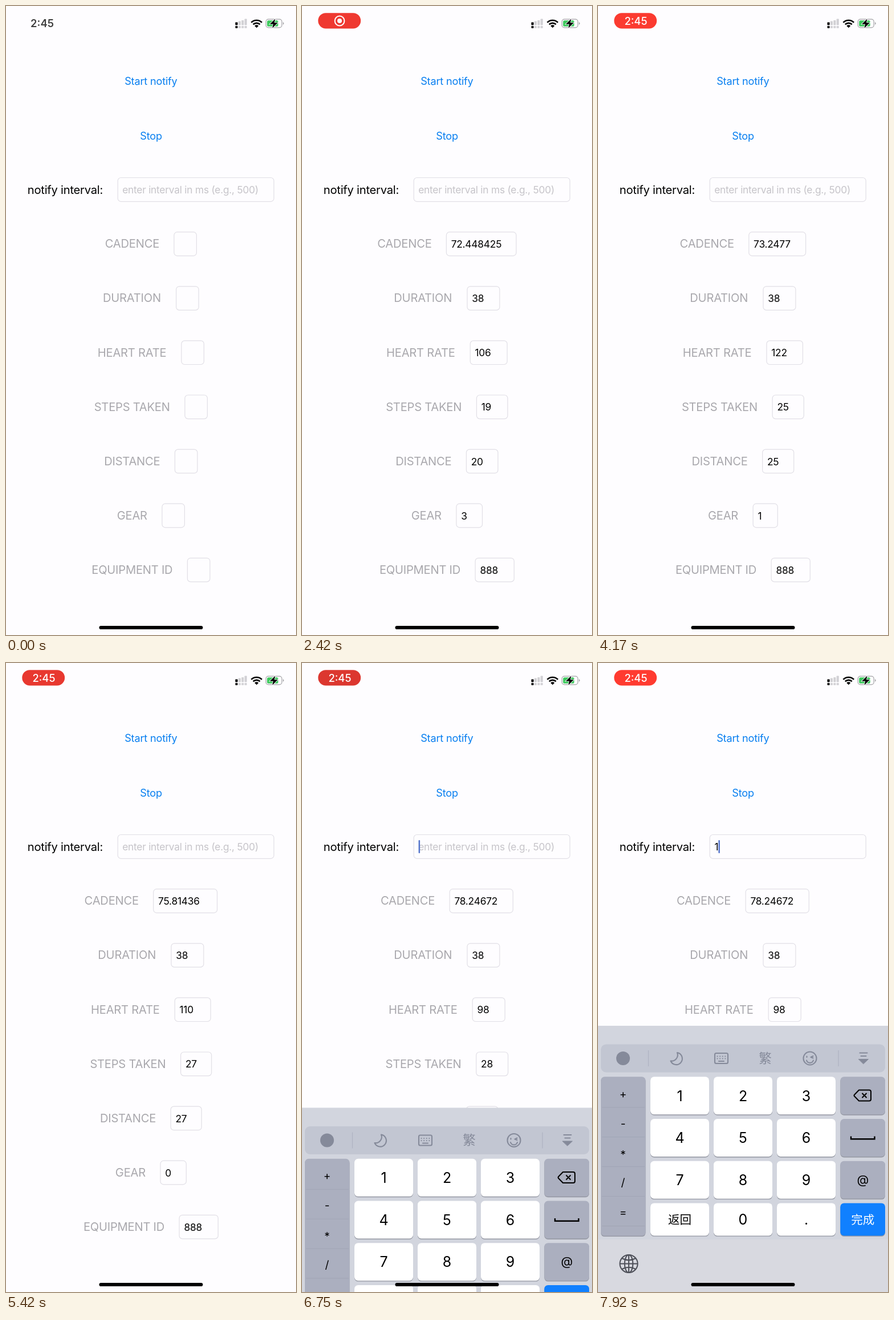
An HTML page for the animation above (8000 ms loop, 509 by 1101 pixels).

```html
<!DOCTYPE html>
<html lang="en">
<head>
<meta charset="utf-8">
<title>Notify monitor</title>
<style>
  html, body { margin: 0; width: 100%; height: 100%; overflow: hidden; background: #fefdff; }
  svg { display: block; font-family: Inter, sans-serif; }
  .label { font-size: 20.2px; letter-spacing: -.25px; fill: #a9a8ad; }
  .value { font-size: 17.4px; letter-spacing: -.26px; }
  .hint { fill: #c6c4c9; }
  .link { font-size: 18.2px; letter-spacing: -.22px; fill: #087ff0; }
  .clock { font-size: 18.4px; }
  .mid { text-anchor: middle; }
  .box { fill: none; stroke: #e1dfe6; stroke-width: 1.2; }
  .digit { font-size: 25px; }
  .sign { font-size: 19px; }
  .cjk { font-family: "Noto Sans CJK SC", "Noto Sans CJK JP", sans-serif; font-size: 20.5px; }
  .tool { fill: none; stroke: #858a9a; stroke-width: 2.1; stroke-linecap: round; stroke-linejoin: round; }
</style>
</head>
<body>
<svg id="stage" width="509" height="1101" viewBox="0 0 509 1101"></svg>
<script>
const LOOP = 8000, STEP = 250 / 3, CENTER = 254.7;
const KEYBOARD_TRAVEL = 466;

// Label and the distance from its left edge to its value box.
const ROWS = [
  ["CADENCE", 120], ["DURATION", 127.5], ["HEART RATE", 146], ["STEPS TAKEN", 158],
  ["DISTANCE", 123], ["GEAR", 78], ["EQUIPMENT ID", 167]
];
const READINGS = [
  [0, ["", "", "", "", "", "", ""]],
  [2000, ["72.448425", "38", "106", "19", "20", "3", "888"]],
  [3000, ["74.118576", "38", "115", "22", "23", "2", "888"]],
  [4000, ["73.2477", "38", "122", "25", "25", "1", "888"]],
  [4666, ["75.81436", "38", "110", "27", "27", "0", "888"]],
  [5500, ["78.24672", "38", "98", "28", "28", "-1", "888"]]
];
const ADVANCE = { 0: 11, 1: 8.8, 2: 10.2, 3: 11.3, 4: 10.6, 5: 10.6, 6: 10.8, 7: 9.6, 8: 11.3, 9: 11.4, ".": 4.6, "-": 7.3 };

const rowY = i => 416.4 + i * 95.1;
const boxWidth = text => text ? [...text].reduce((w, c) => w + ADVANCE[c], 34.3) : 39.5;
const rect = (x, y, w, h, r, fill, more = "") =>
  `<rect x="${x}" y="${y}" width="${w}" height="${h}" rx="${r}" fill="${fill}" ${more}/>`;
const text = (x, y, cls, content, more = "") =>
  `<text x="${x}" y="${y}" class="${cls}" ${more}>${content}</text>`;
const path = (d, more = "") => `<path d="${d}" ${more}/>`;

function statusBar() {
  const bars = [5, 7, 8.5, 11].map((h, i) => {
    const x = 402.5 + i * 5.4, fill = i ? "#d2d1d5" : "#000";
    return rect(x, 33.5 - h, 4.1, h, .8, fill) + rect(x, 35, 4.1, 3.8, .8, fill);
  }).join("");
  const arc = r => {
    const half = r * Math.SQRT1_2;
    return `M${439.8 - half} ${38.2 - half}a${r} ${r} 0 0 1 ${2 * half} 0`;
  };
  const wifi = path(arc(4.9) + "L439.8 38.2z") +
    path(arc(8.4) + arc(13.2), 'fill="none" stroke="#000" stroke-width="2.7"');
  const battery = rect(456.2, 23.2, 28, 14.6, 4.4, "none", 'stroke="#a3a2a6" stroke-width="1.2"') +
    rect(458.2, 25.2, 19.5, 10.6, 2.6, "#3cc95c") +
    path("M486 28.2a2.4 2.4 0 0 1 0 4.6z", 'fill="#a3a2a6"') +
    path("M472.5 22.5l-9.5 9.2h6l-1.6 7 9.6-9.4h-6z", 'stroke="#fefdff" stroke-width="1.6" paint-order="stroke"');
  return bars + wifi + battery +
    text(63.5, 37.2, "clock mid", "2:45", 'id="plainTime" font-weight="600"') +
    `<g id="pill">${rect(28.3, 12.2, 74.8, 27.2, 13.4, "#ff3b30", 'id="pillFill"')}
      <g id="record"><circle cx="66" cy="26" r="8.4" fill="none" stroke="#fff" stroke-width="2"/>
      <circle cx="66" cy="26" r="4" fill="#fff"/></g>
      ${text(66.5, 32.7, "clock mid", "2:45", 'id="pillTime" font-weight="500" fill="#fff"')}</g>`;
}

function form() {
  const rows = ROWS.map(([name], i) => {
    const y = rowY(i);
    return text(0, y + 6.9, "label", name) +
      `<rect class="box" y="${y - 20.7}" height="41.6" rx="5.5"/>` + text(0, y + 6.7, "value", "");
  }).map(row => `<g class="row">${row}</g>`).join("");
  return text(254.4, 138.3, "link mid", "Start notify") + text(254.6, 233.6, "link mid", "Stop") +
    text(37.8, 328.8, "label", "notify interval:", 'style="fill:#000"') +
    '<rect class="box" x="196.2" y="300.5" width="274" height="41.8" rx="5.5"/>' +
    text(204.2, 328, "value hint", "enter interval in ms (e.g., 500)", 'id="hint"') +
    text(204.4, 328, "value", "1", 'id="typed"') +
    rect(0, 310, 2.5, 23, 1.2, "#5374cc", 'id="caret"') + rows;
}

function toolbar() {
  const keys = [0, 1, 2, 3].map(i => `M${209.5 + i * 4.6} 688.5h.1M${209.5 + i * 4.6} 692.5h.1`).join("");
  return rect(5, 667.5, 499, 49, 9, "#c2c6d2") +
    path("M88.5 678v28M422 678v28", 'stroke="#b0b4c3" stroke-width="1.3"') +
    '<circle cx="44" cy="692" r="12" fill="#858a9a"/>' +
    `<g class="tool">${path("M139 682A10.6 10.6 0 1 1 127.5 696.5A10.6 10.6 0 0 0 139 682z")}
      <rect x="205" y="683" width="23" height="18" rx="2.5"/>
      ${path(keys + "M212 697h9")}
      <circle cx="372" cy="692" r="11.5"/>
      ${path("M366.5 688.5v1.5M373.5 690l4-2M373.5 690l4 1.5M366 695.5a6.3 6.3 0 0 0 12 0")}
      ${path("M459.5 682.5h13M461.5 688h9")}
      ${path("M457.5 693.5h17l-8.5 8z", 'fill="#858a9a" stroke-width="1"')}</g>` +
    text(293.5, 700, "cjk mid", "繁", 'style="font-size:22.5px" fill="#858a9a" font-weight="500"');
}

function keyboard() {
  const top = [724.3, 798, 871.7, 945.4], left = [92, 203, 314];
  const key = (x, y, w, h, fill, more) =>
    rect(x, y + 1.4, w, h, 6.5, "#9497a2") + rect(x, y, w, h, 6.5, fill, more);
  const height = r => r < 3 ? 66 : 57;
  const faces = ["1", "2", "3", "4", "5", "6", "7", "8", "9", "返回", "0", "."];
  const pad = faces.map((face, i) => {
    const r = Math.floor(i / 3), x = left[i % 3], cjk = face === "返回";
    return key(x, top[r], 103, height(r), "#fff", i ? "" : 'id="keyOne"') +
      text(x + 51.5, top[r] + height(r) / 2 + (cjk ? 8.4 : 9.2), (cjk ? "cjk" : "digit") + " mid", face);
  }).join("");
  const side = top.map((y, r) => key(425.3, y, 78.7, height(r), r < 3 ? "#abafbf" : "#1080ff")).join("");
  const signs = ["+", "-", "*", "/", "="].map((s, i) =>
    text(44, 761 + i * 51.8 + (s === "*" ? 2 : 0), "sign mid", s)).join("");
  const lines = [0, 1, 2, 3, 4].map(i => `M7 ${777.8 + i * 51.9}h75`).join("");
  return rect(0, 635, 509, 467, 0, "#d2d5de") + rect(0, 1009, 509, 94, 0, "#d8d9e0") + toolbar() +
    key(5, 724.3, 78.5, 278.4, "#abafbf") + path(lines, 'stroke="#a1a5b5"') + signs + pad + side +
    path("M458 747.5h18a3 3 0 0 1 3 3v13a3 3 0 0 1-3 3h-18l-8-8.2q-1-1.3 0-2.6zM463.5 753l8 8m0-8l-8 8",
      'fill="none" stroke="#000" stroke-width="2" stroke-linejoin="round"') +
    path("M444 828.5v4.8h41.5v-4.8", 'fill="none" stroke="#000" stroke-width="2.4"') +
    text(465, 912, "mid", "@", 'font-size="21.5"') +
    text(464.7, 982.3, "cjk mid", "完成", 'fill="#fff"') +
    `<g fill="none" stroke="#4d4f58" stroke-width="2"><circle cx="54" cy="1051.5" r="15.6"/>
      <ellipse cx="54" cy="1051.5" rx="7.3" ry="15.6"/>
      ${path("M54 1036v31M38.5 1051.5h31M42 1042q12 6.5 24 0M42 1061q12-6.5 24 0")}</g>`;
}

const stage = document.getElementById("stage");
stage.innerHTML = rect(0, 0, 509, 1101, 0, "#fefdff") + statusBar() + form() +
  `<g id="keyboard">${keyboard()}</g>` + rect(163.5, 1084.9, 182, 6.2, 3.1, "#000");

const parts = Object.fromEntries(["plainTime", "pill", "pillFill", "record", "pillTime", "hint", "typed", "caret", "keyboard", "keyOne"]
  .map(id => [id, document.getElementById(id)]));
const rowParts = [...document.querySelectorAll(".row")].map(g => [...g.children]);
const ramp = (t, from, to) => Math.min(1, Math.max(0, (t - from) / (to - from)));
const fade = (el, value) => el.setAttribute("opacity", value);

function drawStatus(t) {
  fade(parts.plainTime, .75 * (1 - ramp(t, 0, 250)));
  fade(parts.pill, ramp(t, 160, 500));
  const glow = (1 + Math.cos((t - 3970) / 1000 * Math.PI)) / 2;
  const channel = (dim, bright) => Math.round(dim + (bright - dim) * glow);
  parts.pillFill.setAttribute("fill", `rgb(${channel(216, 255)},${channel(54, 59)},${channel(47, 48)})`);
  const swap = ramp(t, 3000, 3250);
  fade(parts.record, 1 - swap);
  fade(parts.pillTime, swap);
}

function drawRows(t) {
  const values = READINGS.filter(([start]) => t >= start).pop()[1];
  rowParts.forEach(([label, box, value], i) => {
    const offset = ROWS[i][1], width = boxWidth(values[i]);
    const x = CENTER - (offset + width) / 2;
    label.setAttribute("x", x - 1.2);
    box.setAttribute("x", x + offset);
    box.setAttribute("width", width);
    value.setAttribute("x", x + offset + 8.3);
    value.textContent = values[i];
  });
}

function drawInput(t) {
  const typed = t >= 7660;
  fade(parts.hint, typed ? 0 : 1);
  fade(parts.typed, typed ? 1 : 0);
  fade(parts.caret, t >= 6580 && !(t >= 7160 && t < 7500) ? 1 : 0);
  parts.caret.setAttribute("x", typed ? 211.4 : 204.6);
  parts.keyOne.setAttribute("fill", t >= 7580 && t < 7740 ? "#abafbf" : "#fff");
  // Critically damped spring.
  const s = Math.max(0, t - 6659) * .0264;
  const drop = KEYBOARD_TRAVEL * (1 + s) * Math.exp(-s);
  parts.keyboard.setAttribute("transform", `translate(0 ${drop})`);
}

const begin = performance.now();
function frame() {
  const elapsed = (performance.now() - begin) % LOOP;
  const t = Math.floor((elapsed + .5) / STEP) * STEP;
  drawStatus(t);
  drawRows(t);
  drawInput(t);
  requestAnimationFrame(frame);
}
frame();
</script>
</body>
</html>
```
